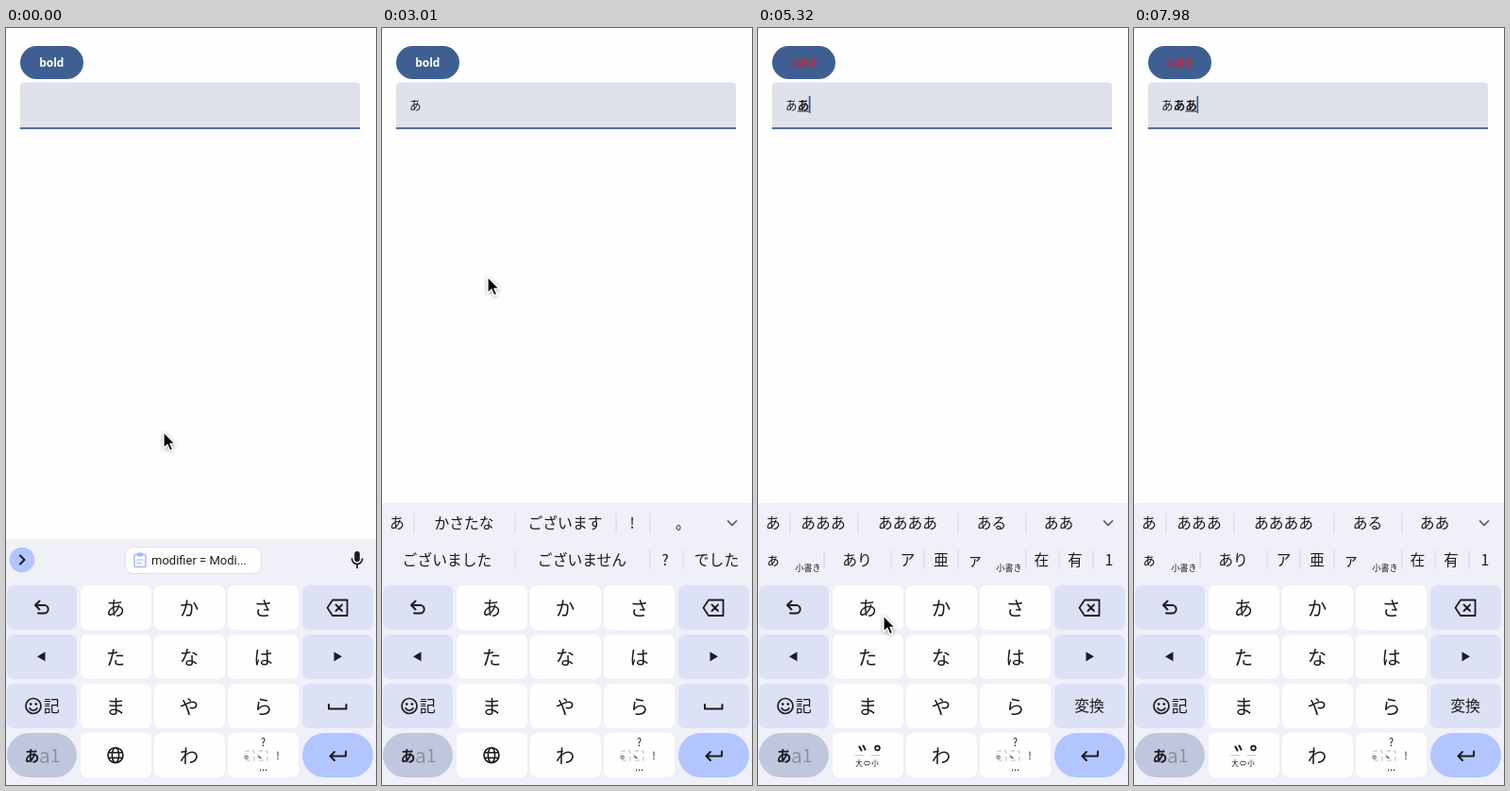
Animation, 392 px wide and 800 px high, one loop 8 s. Source, as an HTML page:

```html
<!DOCTYPE html>
<html lang="ja">
<head>
<meta charset="utf-8">
<title>Bold typing</title>
<style>
html, body { margin: 0; width: 100%; height: 100%; overflow: hidden; background: #fefefe; }
svg { display: block; }
text { font-family: "Noto Sans CJK JP", "Noto Sans", sans-serif; fill: #1b1c20; text-anchor: middle; white-space: pre; }
.line { fill: none; stroke: #1b1c20; stroke-width: 2; stroke-linecap: round; stroke-linejoin: round; }
.latin { font-family: "Noto Sans", sans-serif; }
</style>
</head>
<body>
<svg id="stage" width="392" height="800" viewBox="0 0 392 800"></svg>
<script>
const LOOP = 8000;
const INK = '#1b1c20', SIDE = '#dde1f6', ACCENT = '#b2c5ff', BOARD = '#eff0f8';
const colX = [1, 79, 157, 235, 314], rowY = [589, 641, 693, 745];
const midX = [38, 116, 194, 272.5, 351], midY = [612.5, 664.5, 716.5, 768.5];

const text = (x, y, s, size, more = '') =>
  `<text x="${x}" y="${y + size * 0.37}" font-size="${size}" ${more}>${s}</text>`;
const line = (d, more = '') => `<path class="line" d="${d}" ${more}/>`;
const rect = (x, y, w, h, r, fill, more = '') =>
  `<rect x="${x}" y="${y}" width="${w}" height="${h}" rx="${r}" fill="${fill}" ${more}/>`;
const group = (id, body, more = '') => `<g id="${id}" ${more}>${body}</g>`;
const key = (c, r, fill, radius = 7, id = '') =>
  rect(colX[c], rowY[r], c === 0 ? 74 : 75, 47, radius, fill, id && `id="${id}"`);
const seps = (y, xs) => xs.map(x => rect(x - 0.5, y - 10, 1, 20, 0, '#d4d6e0')).join('');
const words = (y, list) => list.map(([x, s]) => text(x, y, s, 15.8)).join('');

function editor() {
  return rect(15, 19, 67, 35, 17.5, '#3f5f92', 'id="button"') +
    text(48.3, 36.3, 'bold', 12, 'id="label" class="latin"') +
    `<path d="M15 106V61.500a4 4 0 0 1 4-4H371a4 4 0 0 1 4 4V106z" fill="#dfe2eb"/>` +
    rect(15, 105, 360, 1.8, 0, '#3f5f92') +
    [0, 1, 2].map(i => text(35.4 + i * 12.6, 81.5, 'あ', 12.6,
      `id="char${i}" font-weight="${i ? 700 : 400}"`)).join('') +
    rect(0, 87.5, 12.6, 1, 0, INK, 'id="under"') +
    rect(0, 72, 1.8, 18, 0, '#3f5f92', 'id="caret"');
}

function clipBar() {
  return `<circle cx="17" cy="562" r="13.300" fill="${ACCENT}"/>` +
    line('M15 557.500l4.500 4.500-4.500 4.500') +
    rect(126.5, 548.5, 144, 28, 8, '#fefefe', 'stroke="#dcdfed"') +
    rect(136, 556.5, 12, 13, 1.5, 'none', 'stroke="#a3b8f4" stroke-width="1.5"') +
    rect(139, 554.5, 6, 4, 1, '#a3b8f4') +
    line('M139 562h6M139 565.500h4', 'style="stroke:#a3b8f4;stroke-width:1.2"') +
    `<text x="154" y="566.600" font-size="13" style="font-family:Roboto,sans-serif;text-anchor:start">modifier = Modi...</text>` +
    rect(369.2, 553, 5.6, 11, 2.8, INK) +
    line('M366.500 561a5.500 5.500 0 0 0 11 0M372 567v3.500', 'style="stroke-width:1.7"');
}

const moreArrow = line('M366.500 521l4.500 4.500 4.500-4.500', 'style="stroke:#55575f;stroke-width:1.7"');

function predictions() {
  return seps(523, [34, 141, 248, 284]) + seps(562, [141, 284, 319]) +
    words(523, [[16, 'あ'], [87, 'かさたな'], [194, 'ございます'], [265, '!'], [319, '。']]) +
    words(562, [[69, 'ございました'], [212, 'ございません'], [300, '?'], [354.5, 'でした']]) + moreArrow;
}

function candidates() {
  return seps(523, [34, 106, 212, 284]) + seps(562, [70, 141, 176, 212, 284, 319, 355]) +
    words(523, [[16, 'あ'], [69, 'あああ'], [158.5, 'ああああ'], [247.5, 'ある'], [318.5, 'ああ']]) +
    words(562, [[16, 'ぁ'], [105, 'あり'], [158.5, 'ア'], [194, '亜'], [230, 'ァ'],
      [300.5, '在'], [336, '有'], [372, '1']]) +
    [53, 266].map(x => text(x, 571, '小書き', 9)).join('') + moreArrow;
}

function keys() {
  let s = '';
  for (let r = 0; r < 4; r++) {
    for (let c = 0; c < 5; c++) {
      const corner = r === 3 && c % 4 === 0;
      const fill = corner ? (c ? ACCENT : '#c0c6dc') : c % 4 ? '#fefefe' : SIDE;
      s += key(c, r, fill, corner ? 23.5 : 7, `key${c}${r}`);
    }
  }
  'あかさたなはまやら'.split('').forEach((ch, i) => {
    s += text(midX[1 + i % 3], midY[i / 3 | 0] + 0.7, ch, 20.5);
  });
  s += text(194, 769.2, 'わ', 20.5);
  s += line('M35.500 605.500l-4.500 4.500 4.500 4.500M31.500 610h9a4.200 4.200 0 0 1 0 8.400h-6.500');
  s += `<path d="M33 664.300l8.500-5v10zM356 664.300l-8.500-5v10z" fill="${INK}"/>`;
  s += line('M346 604.500h15.500v16.500H346l-5.500-8.250zM349.500 609.500l6.500 6.500M356 609.500l-6.500 6.500', 'style="stroke-width:1.8"');
  s += line('M360 764.500v5h-16.500M348 765l-4.500 4.500 4.500 4.500');
  s += `<circle class="line" cx="29" cy="716.500" r="8" style="stroke-width:1.7"/>` +
    `<circle cx="26.200" cy="714.500" r="1.300"/><circle cx="31.800" cy="714.500" r="1.300"/>` +
    line('M25 718.700a4.400 4.400 0 0 0 8 0', 'style="stroke-width:1.6"') + text(48.3, 717, '記', 17);
  s += text(27.5, 769, 'あ', 16, 'font-weight="700"') +
    text(41, 769, 'a', 21, 'style="fill:#8d92a2" font-weight="300"') +
    text(52, 769, '1', 19, 'style="fill:#8d92a2" font-weight="300"');
  s += text(272.5, 755, '?', 11.5) + text(288, 768.5, '!', 11) + text(272.5, 781, '...', 11) +
    text(258.5, 768, '。', 12) + text(272.5, 768, '、', 12) +
    [253, 267].map(x => rect(x, 764, 10, 10, 0, 'none',
      'stroke="#a8a9ae" stroke-width=".8" stroke-dasharray="5 3"')).join('');
  return s;
}

const globe = `<g class="line" style="stroke-width:1.6"><circle cx="116" cy="768.500" r="8"/>` +
  `<ellipse cx="116" cy="768.500" rx="3.600" ry="8"/><path d="M109 765.700h14M109 771.300h14"/></g>`;
const spaceBar = line('M342 715v4.500h18.500V715');
const marks = line('M107.500 759.500l2 4M111.500 758.500l2 4', 'style="stroke-width:2"') +
  `<circle class="line" cx="126.500" cy="761" r="2.400" style="stroke-width:1.7"/>` +
  line('M103 768.500h9M120 768.500h9', 'style="stroke:#b9bac0;stroke-width:.8"') +
  text(116, 777, '大⇔小', 7.5, 'font-weight="500" letter-spacing="1"');

function popup() {
  return `<circle cx="117" cy="558.500" r="26.500" fill="#fefefe" filter="url(#soft)"/>` +
    text(116.5, 559, 'あ', 20.5) +
    [[116, 540, 'う'], [98, 559, 'い'], [134, 559, 'え'], [116, 577, 'お']]
      .map(([x, y, s]) => text(x, y, s, 11)).join('');
}

document.getElementById('stage').innerHTML =
  `<defs><filter id="soft" x="-30%" y="-30%" width="160%" height="160%">` +
  `<feDropShadow dx="0" dy="1" stdDeviation="2" flood-opacity=".35"/></filter></defs>` +
  rect(0, 0, 392, 800, 0, '#fefefe') + editor() +
  rect(0, 502, 392, 298, 0, BOARD, 'id="board"') +
  group('clip', clipBar()) + group('pred', predictions()) + group('cand', candidates()) +
  keys() + group('idle', globe + spaceBar) +
  group('convert', marks + text(351, 716.5, '変換', 15.8)) +
  group('popup', popup()) +
  `<circle id="ring" r="25.500" fill="#a9c3fb" fill-opacity=".3" stroke="#8fb1f4" stroke-width="4"/>` +
  group('mouse', `<path d="M0 0V17l4-3.600 2.700 6.200 2.900-1.300-2.600-6H12z" fill="#000" stroke="#fff" stroke-width="1.300" filter="url(#soft)"/>`);

const $ = id => document.getElementById(id);
const set = (id, name, value) => $(id).setAttribute(name, value);
const show = (id, on) => set(id, 'display', on ? 'inline' : 'none');
const within = (t, spans) => spans.some(([a, b]) => t >= a && t < b);

const ease = {
  both: u => u * u * (3 - 2 * u),
  into: u => u * u,
  out: u => 1 - (1 - u) * (1 - u),
};
// time, x, y, easing towards this point
const path = [
  [0, 167, 427], [840, 132, 613, 'both'], [980, 132, 614, 'both'], [1250, 132, 614],
  [1750, 346, 764, 'both'], [2200, 347, 766, 'both'], [2800, 112, 263, 'both'], [3010, 112, 263],
  [3430, 50, 38, 'both'], [3780, 50, 38], [4340, 53, 568, 'into'], [4620, 133, 621, 'out'],
  [5750, 133, 621], [6040, 347, 766, 'both'], [6300, 347, 766], [7000, 133, 609, 'both'],
  [7650, 133, 609], [7950, 412, 650, 'both'], [LOOP, 412, 650],
];
const kanaTaps = [[890, 1140], [4760, 5110], [7350, 7600]];
const enterTaps = [[1960, 2100], [6040, 6180]];
const boldTap = [3550, 3690];
const composing = [[1140, 2100], [5110, 6180], [7600, LOOP]];
const caretOn = [[460, 890], [1140, 1640], [2100, 2600], [3100, 3600], [4100, 4600],
  [5110, 5600], [6180, 6680], [7140, LOOP]];

function mouseAt(t) {
  const i = Math.max(1, path.findIndex(p => p[0] > t));
  const a = path[i - 1], b = path[i];
  const u = ease[b[3] || 'both']((t - a[0]) / (b[0] - a[0]));
  return [a[1] + (b[1] - a[1]) * u, a[2] + (b[2] - a[2]) * u];
}

function draw(t) {
  const count = kanaTaps.filter(p => t >= p[1]).length;
  const comp = within(t, composing), kana = within(t, kanaTaps), enter = within(t, enterTaps);
  const red = t >= 3620, [x, y] = mouseAt(t);

  const glow = t < boldTap[0] ? 0 : Math.min(1, (t - boldTap[0]) / 150, Math.max(0, (4600 - t) / 250));
  set('button', 'fill', `rgb(${63 + 10 * glow},${95 + 10 * glow},${146 + 7 * glow})`);
  $('label').style.fill = red ? '#f5101c' : '#fff';
  $('label').style.fontWeight = red ? 400 : 600;

  for (let i = 0; i < 3; i++) show('char' + i, i < count);
  show('under', comp);
  set('under', 'x', 29.1 + 12.6 * (count - 1));
  show('caret', within(t, caretOn));
  set('caret', 'x', 28.6 + 12.6 * count);

  const top = count ? 502 : 540;
  set('board', 'y', top);
  set('board', 'height', 800 - top);
  show('clip', !count);
  show('pred', count && !comp);
  show('cand', comp);
  show('idle', !comp);
  show('convert', comp);

  set('key10', 'fill', kana ? SIDE : '#fefefe');
  set('key43', 'fill', enter ? '#9bb0ec' : ACCENT);
  show('popup', kana);
  show('ring', kana || enter || within(t, [boldTap]));
  set('ring', 'cx', x + 1.5);
  set('ring', 'cy', y + 1);
  set('mouse', 'transform', `translate(${x} ${y})`);
}

const start = performance.now();
function tick() {
  draw((performance.now() - start) % LOOP);
  requestAnimationFrame(tick);
}
tick();
</script>
</body>
</html>
```
